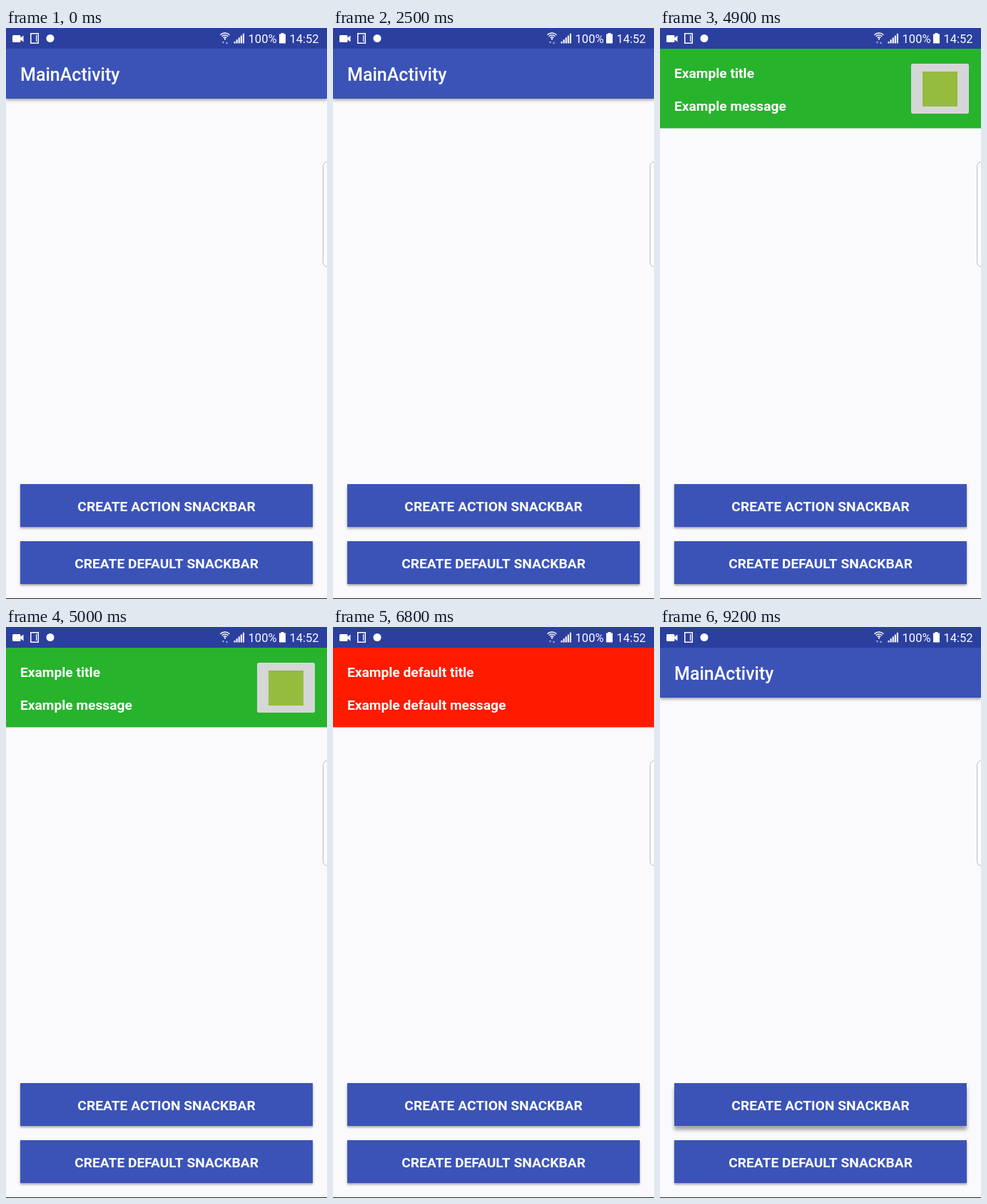
These frames come from a looping animation (450 by 800 pixels, 9300 ms). An HTML page with a canvas:

```html
<!DOCTYPE html>
<html lang="en">
<head>
<meta charset="utf-8">
<title>Snackbar demo</title>
<style>
html, body { margin: 0; width: 100%; height: 100%; overflow: hidden; background: #faf9fc; }
canvas { display: block; width: 450px; height: 800px; }
</style>
</head>
<body>
<canvas id="stage"></canvas>
<script>
const W = 450, H = 800, LOOP = 9300;
const BLUE = '#3b53b7', STATUS = '#2b3f9f', PAPER = '#faf9fc';
const BOLD = 'bold 19.2px Roboto, sans-serif';
const canvas = document.getElementById('stage');
const ctx = canvas.getContext('2d');
const ratio = window.devicePixelRatio || 1;
canvas.width = W * ratio;
canvas.height = H * ratio;

function rect(x, y, w, h, color) {
  ctx.fillStyle = color;
  ctx.fillRect(x, y, w, h);
}

function text(label, x, y, font, align = 'left') {
  ctx.font = font;
  ctx.textAlign = align;
  ctx.fillStyle = '#fff';
  ctx.fillText(label, x, y);
}

function polygon(points, color) {
  ctx.fillStyle = color;
  ctx.beginPath();
  points.forEach(([x, y]) => ctx.lineTo(x, y));
  ctx.fill();
}

function raised(x, y, w, h, depth, blur, alpha) {
  ctx.save();
  ctx.shadowColor = `rgba(0,0,0,${alpha})`;
  ctx.shadowOffsetY = depth * ratio;
  ctx.shadowBlur = blur * ratio;
  rect(x, y, w, h, BLUE);
  ctx.restore();
}

function drawStatusBar() {
  rect(0, 0, W, 29, STATUS);

  // camera
  ctx.fillStyle = '#fff';
  ctx.beginPath();
  ctx.roundRect(9, 10, 11.5, 10, 1.5);
  ctx.fill();
  polygon([[20, 14], [24.5, 10.5], [24.5, 19.5], [20, 16]], '#fff');

  // device
  ctx.strokeStyle = '#fff';
  ctx.lineWidth = 1.5;
  ctx.strokeRect(34.75, 7.75, 10.5, 13.5);
  rect(42, 10, 1.2, 9, '#fff');

  ctx.fillStyle = '#fff';
  ctx.beginPath();
  ctx.arc(62, 14.5, 5.5, 0, 7);
  ctx.fill();

  // wireless
  ctx.lineWidth = 1.4;
  for (const r of [3, 6, 9]) {
    ctx.beginPath();
    ctx.arc(307, 16, r, -Math.PI * 0.76, -Math.PI * 0.24);
    ctx.stroke();
  }
  rect(306, 14.5, 2, 2, '#fff');
  polygon([[303, 19], [306, 19], [304.5, 22]], '#aab2dc');
  polygon([[308, 22], [311, 22], [309.5, 19]], '#aab2dc');

  // signal
  for (let i = 0; i < 5; i++) {
    const h = 2.5 + i * 2.8;
    rect(319.5 + i * 3.1, 21.5 - h, 2.1, h, '#fff');
  }

  const font = '16.5px Roboto, sans-serif';
  text('100%', 379.5, 21, font, 'right');
  text('14:52', 397.5, 21, font);

  // battery
  rect(385.5, 7, 4, 2, '#fff');
  rect(383, 8.5, 9, 13, '#fff');
}

function drawButton(y, label, lift) {
  raised(20, y, 410, 60, 2 + 3.5 * lift, 3 + 2 * lift, 0.36);
  text(label, 225, y + 37.5, BOLD, 'center');
}

function drawEdgeHandle() {
  ctx.beginPath();
  ctx.roundRect(444.5, 187.5, 16, 147, 6);
  ctx.fillStyle = '#fcfbfd';
  ctx.fill();
  ctx.strokeStyle = '#bdbcc0';
  ctx.lineWidth = 1;
  ctx.stroke();
}

function drawSnackbar(color, title, message) {
  rect(0, 29, W, 111.5, color);
  text(title, 20, 69.5, BOLD);
  text(message, 20, 115.5, BOLD);
}

function drawActionButton() {
  ctx.fillStyle = '#d5d6d7';
  ctx.beginPath();
  ctx.roundRect(352, 50, 81, 70, 2.5);
  ctx.fill();
  rect(368, 61, 49, 49, '#95bb3f');
}

// How far the first button is raised by a press
function liftAt(t) {
  if (t >= 9200) return 1;
  if (t >= 2500 && t < 2600) return 0.25;
  if (t >= 2600 && t < 2800) return 0.8;
  return 0;
}

function draw(t) {
  ctx.setTransform(ratio, 0, 0, ratio, 0, 0);
  rect(0, 0, W, H, PAPER);
  raised(0, 29, W, 70, 2, 4, 0.36);
  text('MainActivity', 20, 73.5, '500 25px Roboto, sans-serif');
  drawStatusBar();
  drawEdgeHandle();
  drawButton(639, 'CREATE ACTION SNACKBAR', liftAt(t));
  drawButton(719, 'CREATE DEFAULT SNACKBAR', 0);
  rect(0, 799, W, 1, '#29292b');

  if (t >= 2700 && t < 6700) {
    drawSnackbar('#27b32c', 'Example title', 'Example message');
    drawActionButton();
  } else if (t >= 6800 && t < 9100) {
    drawSnackbar('#ff1a00', 'Example default title', 'Example default message');
  }
}

function tick() {
  draw(performance.now() % LOOP);
  requestAnimationFrame(tick);
}
tick();
</script>
</body>
</html>
```
